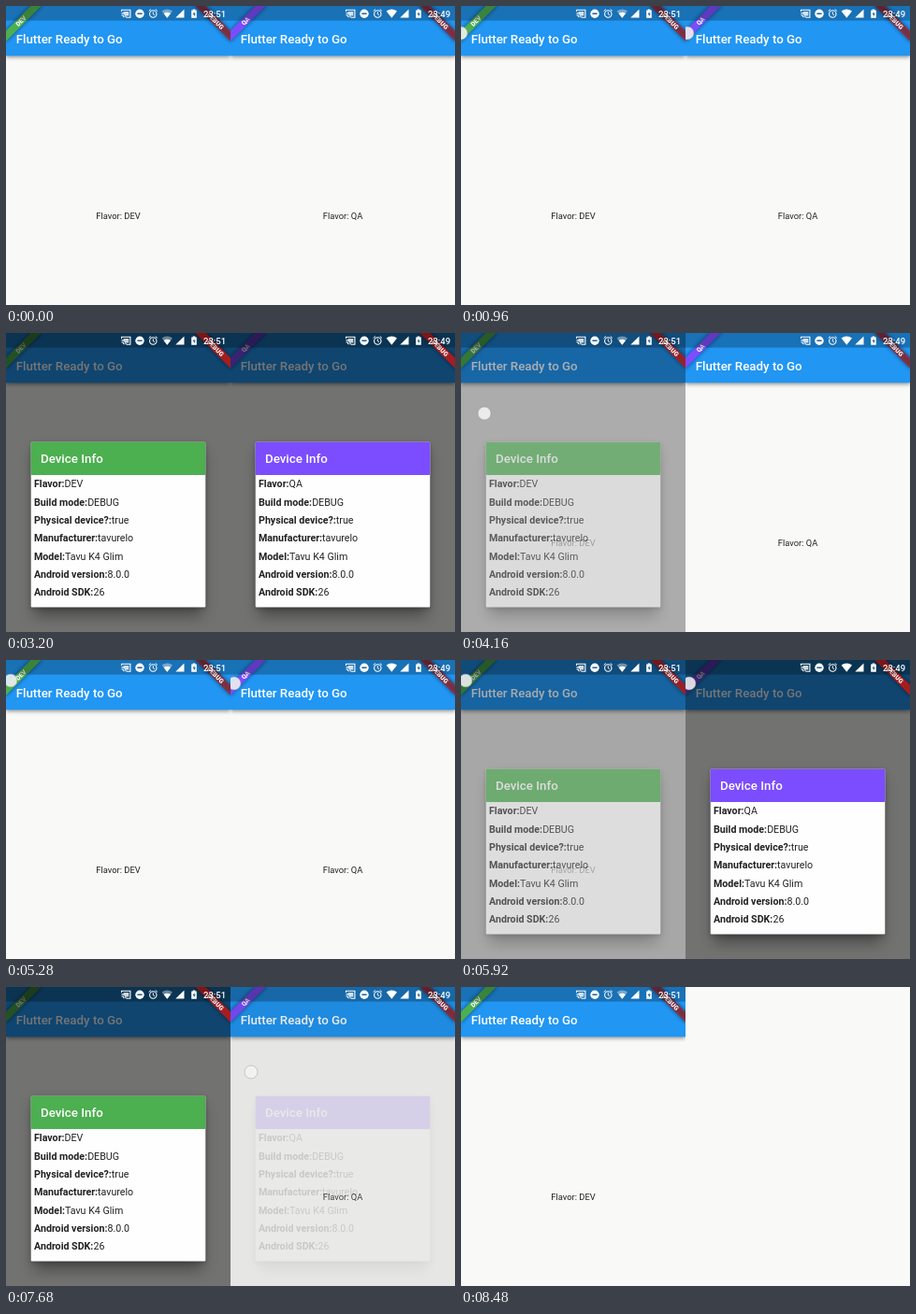
Animation, 480 px wide and 320 px high, one loop 8640 ms. Source, as an HTML page:

```html
<!DOCTYPE html>
<html lang="en">
<head>
<meta charset="utf-8">
<title>Flavor banner demo</title>
<style>
  html, body { margin: 0; width: 100%; height: 100%; overflow: hidden; background: #f9faf8; }
  svg { display: block; }
  text { font-family: Roboto, sans-serif; fill: #212121; white-space: pre; }
  .title { font-size: 13.33px; font-weight: 500; fill: #fff; }
  .body { font-size: 9.33px; }
  .row { font-size: 10.67px; }
  .row tspan { font-weight: 700; }
  .clock { font-size: 9.5px; font-weight: 500; fill: #fff; }
  .tag { font-size: 6.8px; font-weight: 900; fill: #fff; text-anchor: middle; }
  .mid { text-anchor: middle; }
</style>
</head>
<body>
<svg id="stage" width="480" height="320" viewBox="0 0 480 320">
  <defs>
    <clipPath id="screen"><rect width="240" height="320"/></clipPath>
    <filter id="soft2" x="-20%" y="-50%" width="140%" height="200%"><feGaussianBlur stdDeviation="2"/></filter>
    <filter id="soft8" x="-20%" y="-20%" width="140%" height="140%"><feGaussianBlur stdDeviation="8"/></filter>
    <g id="icons" fill="#fff">
      <path d="M123.5 6V4.3h9.4v8h-4.2M123.5 7.6a4.7 4.7 0 0 1 4.7 4.7M123.5 9.7a2.6 2.6 0 0 1 2.6 2.6" fill="none" stroke="#fff" stroke-width="1.1"/>
      <path d="M125.5 6h5.8v4.6h-2.8a6 6 0 0 0-3-3z" opacity=".8"/>
      <circle cx="143" cy="8.2" r="4.7"/>
      <path d="M140.4 8.2h5.2" stroke="#1c5f93" stroke-width="1.5"/>
      <circle cx="157.3" cy="8.5" r="3.7" fill="none" stroke="#fff" stroke-width="1.1"/>
      <path d="M157.3 6.3v2.4l1.6 1M152.7 5.4l2.2-1.9M161.9 5.4l-2.2-1.9" fill="none" stroke="#fff"/>
      <path d="M181.3 12.6h9.2V3.4z"/>
      <path d="M198.2 4.5h1.5v-1h2.6v1h1.5v8.3h-5.6z"/>
      <path d="M201.5 6l-1.9 3h1.2v2.3l2-3.1h-1.3z" fill="#1c5f93"/>
    </g>
  </defs>
</svg>
<script>
const LOOP = 8640, STEP = 160, FADE = 150;
const SVG = "http://www.w3.org/2000/svg";

// shows: [open, close] times of the dialog; taps: [down, up, x, y]
const phones = [
  {
    x: 0, flavor: "DEV", color: "#4caf50", clock: "23:51", weakWifi: true, end: LOOP,
    shows: [[1520, 4097], [5827, 7760]],
    taps: [[950, 1700, 0, 29], [3990, 4200, 25, 86], [5270, 6010, 5, 22], [7700, 7900, 24, 88]]
  },
  {
    x: 240, flavor: "QA", color: "#7c4dff", clock: "23:49", weakWifi: false, end: 8320,
    shows: [[1290, 3850], [5610, 7552]],
    taps: [[790, 1500, 2, 29], [3750, 3990, 22, 88], [5080, 6000, 4, 25], [7500, 7700, 22, 91]]
  }
];

const info = flavor => [
  ["Flavor", flavor], ["Build mode", "DEBUG"], ["Physical device?", "true"],
  ["Manufacturer", "tavurelo"], ["Model", "Tavu K4 Glim"],
  ["Android version", "8.0.0"], ["Android SDK", "26"]
];

const banner = (x, angle, label, color, cls) => `
  <g transform="translate(${x} 0) rotate(${angle})">
    <rect x="-27" y="18.67" width="54" height="8" opacity=".5" filter="url(#soft2)"/>
    <rect class="${cls}" x="-27" y="18.67" width="54" height="8" fill="${color}"/>
    <text class="tag" x="0" y="25.1">${label}</text>
  </g>`;

const wifi = weak => `
  <path d="M172.3 12.8L166.6 5.6a9.2 9.2 0 0 1 11.4 0z" fill="#fff" opacity="${weak ? .4 : 1}"/>
  ${weak ? '<path d="M172.3 12.8L168.6 8.1a6 6 0 0 1 7.4 0z" fill="#fff"/>' : ""}`;

const dialog = p => `
  <g class="dialog">
    <rect x="30" y="126" width="180" height="176" opacity=".38" filter="url(#soft8)"/>
    <rect x="26.7" y="118.5" width="186.6" height="176.5" opacity=".25" filter="url(#soft2)"/>
    <rect x="26.7" y="116.7" width="186.6" height="176.8" rx="1" fill="#fefefe"/>
    <rect x="26.7" y="116.7" width="186.6" height="35.2" rx="1" fill="${p.color}"/>
    <text class="title" x="37" y="139.4">Device Info</text>
    ${info(p.flavor).map(([key, value], i) =>
      `<text class="row" x="30" y="${165.2 + i * 19.33}"><tspan>${key}:</tspan>${value}</text>`).join("")}
  </g>`;

const markup = p => `
  <rect width="240" height="320" fill="#f9faf8"/>
  <rect y="17" width="240" height="38" opacity=".4" filter="url(#soft2)"/>
  <rect width="240" height="53.3" fill="#2196f3"/>
  <text class="title" x="10.7" y="39.7">Flutter Ready to Go</text>
  <text class="body mid" x="120" y="227.5">Flavor: ${p.flavor}</text>
  ${banner(0, -45, p.flavor, p.color, "flavor")}
  <rect class="scrim" width="240" height="320"/>
  ${dialog(p)}
  ${banner(240, 45, "DEBUG", "#b71c1c", "debug")}
  <rect width="240" height="15.6" opacity=".25"/>
  <use href="#icons"/>
  ${wifi(p.weakWifi)}
  <text class="clock" x="211" y="11.7">${p.clock}</text>
  <circle class="dot" r="7" fill="#f4f4f4" fill-opacity=".88" stroke="#8a8a8a" stroke-opacity=".5" stroke-width=".8"/>`;

const stage = document.getElementById("stage");
for (const p of phones) {
  const slot = document.createElementNS(SVG, "g");
  slot.setAttribute("transform", `translate(${p.x} 0)`);
  slot.innerHTML = `<g clip-path="url(#screen)">${markup(p)}</g>`;
  stage.append(slot);
  p.slot = slot;
  for (const part of ["scrim", "dialog", "debug", "dot"]) p[part] = slot.querySelector("." + part);
}

const clamp = v => Math.max(0, Math.min(1, v));

function visibility(shows, t) {
  return Math.max(...shows.map(([open, close]) =>
    Math.min(clamp((t - open) / FADE), clamp(1 - (t - close) / FADE))));
}

function draw(t) {
  for (const p of phones) {
    const v = visibility(p.shows, t);
    const tap = p.taps.find(([down, up]) => t >= down && t < up);
    p.slot.style.display = t < p.end ? "" : "none";
    p.scrim.style.opacity = 0.54 * v;
    p.dialog.style.opacity = v;
    p.debug.style.opacity = 0.63 + 0.27 * v;
    p.dot.style.display = tap ? "" : "none";
    if (tap) p.dot.setAttribute("transform", `translate(${tap[2]} ${tap[3]})`);
  }
}

const start = performance.now();
function tick() {
  const t = (performance.now() - start) % LOOP;
  draw(Math.floor(t / STEP) * STEP);
  requestAnimationFrame(tick);
}
tick();
</script>
</body>
</html>
```
